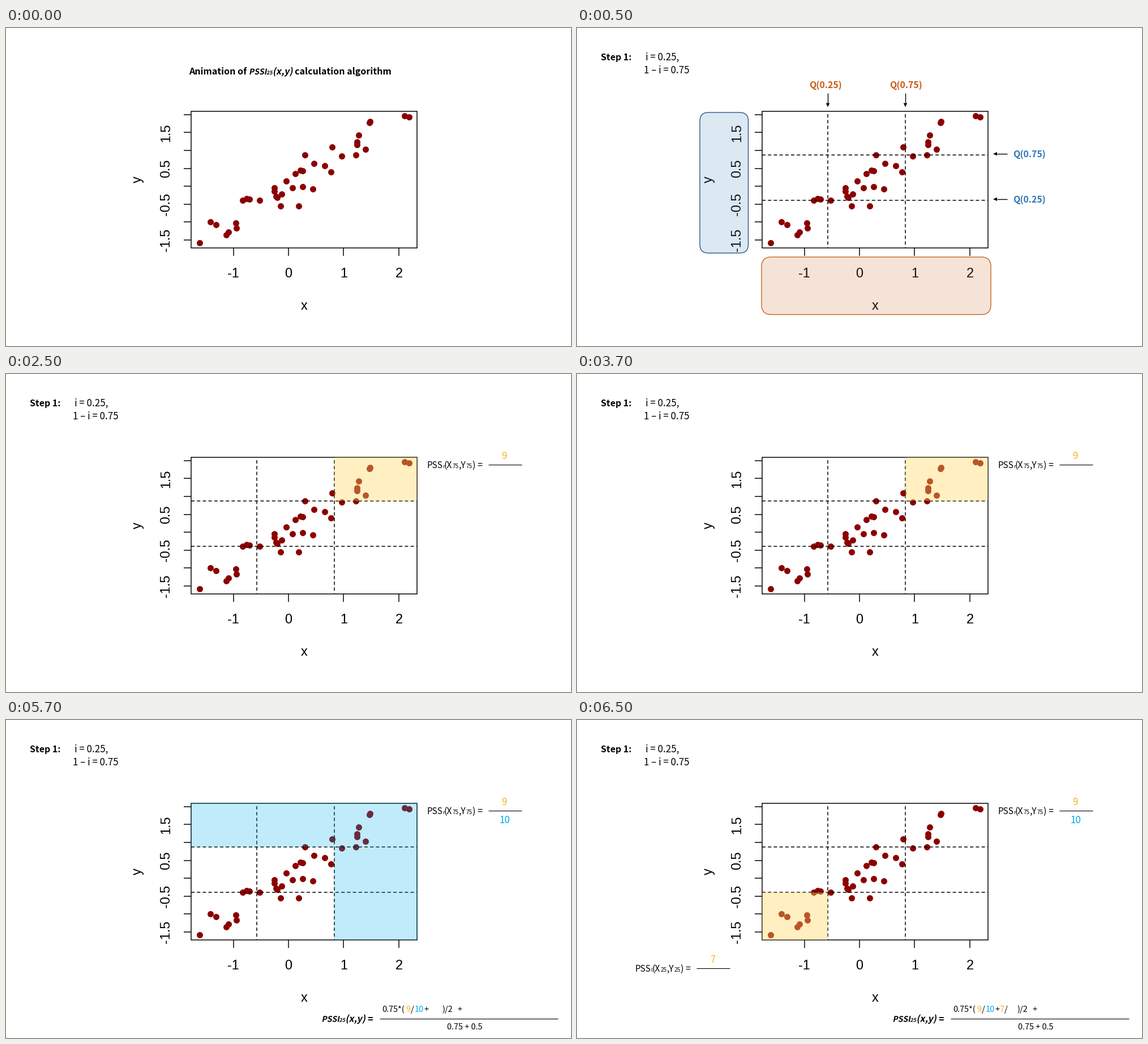
Write a matplotlib script that moves like this. It is 998x561 px and loops after 8 s.

```python
import matplotlib.pyplot as plt
from matplotlib.animation import FuncAnimation
from matplotlib.patches import FancyBboxPatch, PathPatch, Polygon, Rectangle
from matplotlib.textpath import TextPath
from matplotlib.transforms import Affine2D

W, H = 998, 561
STEP_MS = 500
STARTS = (0, 500, 2500, 4500, 6500)
LOOP_MS = 8000

SANS = "Noto Sans CJK JP"
AXIS_FONT = "Liberation Sans"
GOLD, CYAN = "#F2B823", "#00AAE9"
ORANGE, BLUE = "#C55A11", "#2E75B6"

LEFT, RIGHT, TOP, BOTTOM = 327.5, 726.5, 146.5, 387.5
QX, QY = (443.5, 580.5), (303.5, 223.5)

POINTS = [
    (342, 378.5), (361, 342), (371, 346.5), (389, 365), (393, 360),
    (406.5, 344), (407, 352.5), (418, 304), (425, 301), (430, 302),
    (448, 304), (474, 282), (474, 287.5), (477, 297), (479.5, 298.5),
    (487, 293), (485, 313.5), (495.5, 270), (506.5, 281.5), (511.5, 257),
    (520, 250.5), (524.5, 251.5), (524.5, 279.5), (517, 313.5), (528, 223.5),
    (542.5, 284), (544.5, 238.5), (563, 243), (574, 253.5), (576, 210),
    (593.5, 225.5), (618.5, 224), (620, 206), (620.5, 201), (623, 189),
    (635, 214), (642.5, 166.5), (643.5, 165), (704.5, 155), (712, 156.5),
]

# At 72 dpi one point is one pixel.
fig = plt.figure(figsize=(W / 72, H / 72), dpi=72, facecolor="white")
ax = fig.add_axes([0, 0, 1, 1])
ax.set(xlim=(0, W), ylim=(H, 0))
ax.axis("off")

ALL = range(5)
staged = []


def show(stages, artist):
    staged.append((artist, stages))


def text(stages, x, y, s, size=17, color="black", family=SANS, **kw):
    kw.setdefault("va", "baseline")
    show(stages, ax.text(x, y, s, fontsize=size, color=color, family=family, **kw))


def slanted(stages, x, y, s, size):
    path = TextPath((0, 0), s, size=size, prop={"family": SANS, "weight": "bold"})
    place = Affine2D().skew_deg(11, 0).scale(1, -1).translate(x, y)
    show(stages, ax.add_patch(PathPatch(path, fc="black", lw=0, zorder=5,
                                        transform=place + ax.transData)))


def line(stages, x0, y0, x1, y1, lw=1.5, **kw):
    kw.setdefault("color", "black")
    show(stages, ax.plot([x0, x1], [y0, y1], lw=lw, solid_capstyle="butt", **kw)[0])


def polygon(stages, corners, color, alpha):
    show(stages, ax.add_patch(Polygon(corners, fc=color, alpha=alpha, lw=0, zorder=4)))


def rounded_box(stages, x0, y0, x1, y1, radius, fill, edge):
    for style in (dict(fc=fill, alpha=0.165, lw=0), dict(fc="none", ec=edge, lw=1.3)):
        show(stages, ax.add_patch(FancyBboxPatch(
            (x0, y0), x1 - x0, y1 - y0, zorder=4,
            boxstyle=f"round,pad=0,rounding_size={radius}", **style)))


def arrow(stages, x0, y0, x1, y1):
    length = abs(x1 - x0) + abs(y1 - y0)
    ux, uy = (x1 - x0) / length, (y1 - y0) / length
    bx, by = x1 - 7 * ux, y1 - 7 * uy
    line(stages, x0, y0, bx, by, lw=1.4)
    polygon(stages, [(x1, y1), (bx - 3.2 * uy, by + 3.2 * ux),
                     (bx + 3.2 * uy, by - 3.2 * ux)], "black", 1)


def scatter_plot():
    show(ALL, ax.add_patch(Rectangle((LEFT, TOP), RIGHT - LEFT, BOTTOM - TOP,
                                     fill=False, lw=1.5, zorder=2)))
    xs, ys = zip(*POINTS)
    show(ALL, ax.scatter(xs, ys, s=11 ** 2, c="#8B0000", lw=0, zorder=3))
    for i, x in enumerate((402, 499, 596.5, 694)):
        line(ALL, x, BOTTOM, x, 402)
        text(ALL, x - (1 if i == 0 else 0), 439.5, str(i - 1), 23.5,
             family=AXIS_FONT, ha="center")
    for i in range(8):
        y = 374 - 31.6 * i
        line(ALL, 314, y, LEFT, y)
        if i % 2 == 0:
            text(ALL, 294.5, y, f"{-1.5 + i / 2:.1f}", 23.5, family=AXIS_FONT,
                 rotation=90, ha="right", va="center")
    text(ALL, 526.5, 497, "x", 23.5, family=AXIS_FONT, ha="center")
    text(ALL, 233, 267, "y", 23.5, family=AXIS_FONT, rotation=90,
         ha="center", va="center")


def quantile_lines(stages):
    dash = dict(ls=(0, (4, 2.8)), zorder=4)
    for x in QX:
        line(stages, x, 152, x, BOTTOM, **dash)
    for y in QY:
        line(stages, LEFT, y, RIGHT, y, **dash)


def index_name(stages, x, y):
    slanted(stages, x, y, "PSSI", 14)
    slanted(stages, x + 31, y, "25", 9)
    slanted(stages, x + 42, y, "(x,y)", 16)


def ratio(stages, x, y, side, level):
    """Label and fraction bar; y is the height of the bar."""
    base = y + 6
    for dx, s, size in ((0, "PSS", 15.3), (27, side, 9), (30, "(X", 15.7),
                        (45, level, 10), (55, ",Y", 15.7), (69, level, 10),
                        (80, ") =", 16)):
        text(stages, x + dx, base, s, size)
    line(stages, x + 108, y, x + 167, y, lw=1.1)


def count(stages, x, y, s, color):
    text(stages, x, y, s, 17, color, ha="center")


def runs(stages, y, parts):
    for x, s, color in parts:
        text(stages, x, y, s, 14.5, color)


scatter_plot()

# Title
title = (0,)
text(title, 323, 82, "Animation of", 16, weight="bold")
index_name(title, 429, 82)
text(title, 510, 82, "calculation algorithm", 16, weight="bold")

# Step heading
steps = (1, 2, 3, 4)
text(steps, 42.5, 57, "Step 1:", 16, weight="bold")
text(steps, 121.5, 57, "i = 0.25,")
text(steps, 118, 80, "1 – i = 0.75")
quantile_lines(steps)

# Quantiles
intro = (1,)
rounded_box(intro, 217, 149, 302.5, 397, 15, BLUE, "#1F4E79")
rounded_box(intro, 326, 404, 731, 505.5, 17, ORANGE, ORANGE)
for x, label_x, q in ((443, 439, "0.25"), (580, 581.5, "0.75")):
    text(intro, label_x, 105.5, f"Q({q})", 16, ORANGE, weight="bold", ha="center")
    arrow(intro, x, 115, x, 139.5)
for y, q in ((222, "0.75"), (302, "0.25")):
    text(intro, 799, y + 6, f"Q({q})", 16, BLUE, weight="bold", ha="center")
    arrow(intro, 760, y, 735, y)

# Highlighted regions
polygon((2,), [(QX[1], 147), (RIGHT, 147), (RIGHT, QY[1]), (QX[1], QY[1])],
        "#FFD966", 0.4)
polygon((3,), [(LEFT, 146), (727, 146), (727, 388), (QX[1], 388),
               (QX[1], QY[1]), (LEFT, QY[1])], "#00B0F0", 0.25)
polygon((4,), [(LEFT, QY[0]), (QX[0], QY[0]), (QX[0], 388), (LEFT, 388)],
        "#FFD966", 0.4)

# Ratios
ratio((2, 3, 4), 744, 159.5, "r", "75")
count((2, 3, 4), 880, 149.5, "9", GOLD)
count((3, 4), 881, 181.5, "10", CYAN)
ratio((4,), 103, 437.5, "l", "25")
count((4,), 239.5, 428, "7", GOLD)

# Final formula
final = (3, 4)
index_name(final, 557.5, 532.5)
text(final, 638, 532.5, "=", 16, weight="bold")
line(final, 660, 526.5, 975, 526.5, lw=1.1)
runs(final, 515, [(664, "0.75*(", "black"), (706.5, "9", GOLD),
                  (715, "/", "black"), (721.5, "10", CYAN), (738, "+", "black")])
runs((3,), 515, [(770, ")/2", "black"), (797, "+", "black")])
runs((4,), 515, [(746.5, "7", GOLD), (755, "/", "black"),
                 (777.5, ")/2", "black"), (804.5, "+", "black")])
runs(final, 546, [(779.5, "0.75 + 0.5", "black")])


def update(frame):
    stage = sum(frame * STEP_MS >= start for start in STARTS) - 1
    for artist, stages in staged:
        artist.set_visible(stage in stages)
    return [artist for artist, _ in staged]


anim = FuncAnimation(fig, update, frames=LOOP_MS // STEP_MS, interval=STEP_MS,
                     repeat=True, repeat_delay=0)
plt.show()
```
